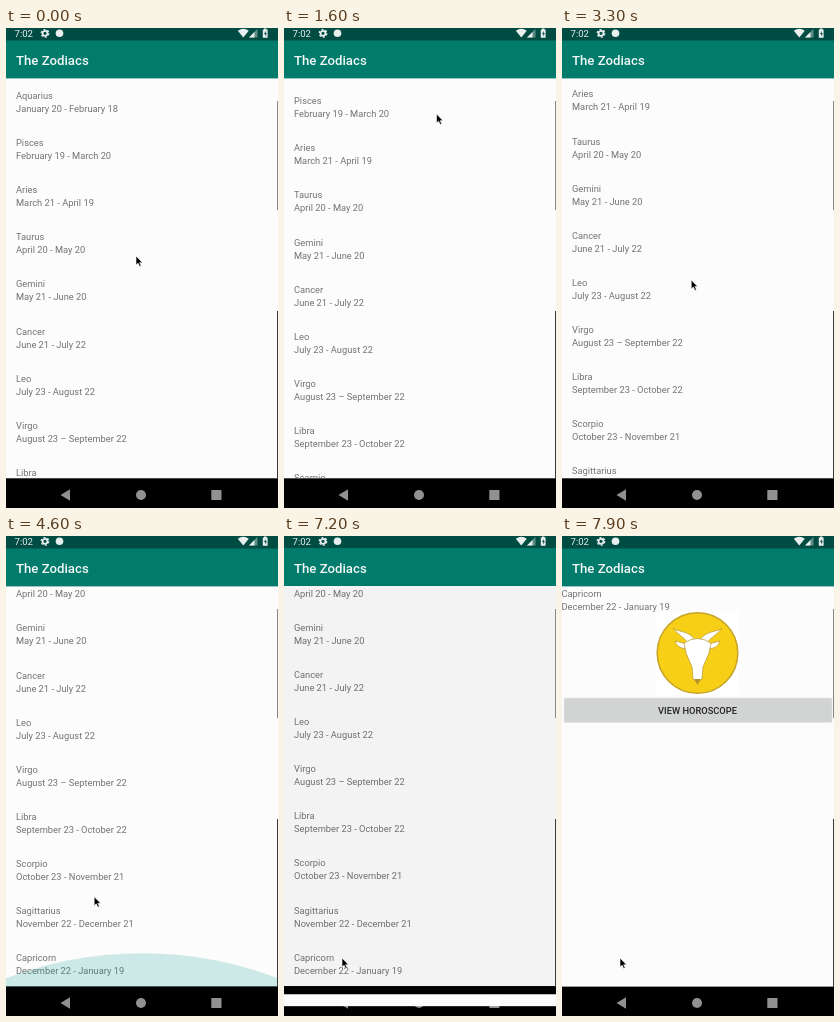
An HTML page that plays this animation: 272x480 px, repeating every 8000 ms.

```html
<!DOCTYPE html>
<html lang="en">
<head>
<meta charset="utf-8">
<title>The Zodiacs</title>
<style>
  html, body { margin: 0; width: 100%; height: 100%; overflow: hidden; background: #000; }
  svg { display: block; width: 100%; height: 100%; overflow: hidden; }
  text { font-family: Roboto, "Open Sans", sans-serif; font-size: 9.3px; fill: #737373; }
  .title { font-size: 13.2px; font-weight: 500; fill: #f4f8f7; }
  .clock { font-size: 9.6px; fill: #e8efee; }
  .button { font-weight: 500; fill: #222; text-anchor: middle; }
</style>
</head>
<body>
<svg viewBox="0 0 272 480">
  <defs>
    <clipPath id="pane"><rect y="50" width="272" height="400.6"/></clipPath>
    <clipPath id="reveal"><rect id="edge" width="272" height="480"/></clipPath>
    <g id="bar">
      <rect width="272" height="50.4" fill="#007b6c"/>
      <rect width="272" height="12.5" fill="#004c42"/>
      <text class="title" x="10" y="37">The Zodiacs</text>
    </g>
    <rect id="page" y="50" width="272" height="400.6" fill="#fcfcfc"/>
  </defs>

  <g id="home">
    <g id="content" clip-path="url(#pane)">
      <use href="#page"/>
      <g id="list"></g>
      <circle id="glow" cx="136" cy="833" r="382" fill="#009688"/>
    </g>
    <use href="#bar"/>
  </g>

  <g clip-path="url(#reveal)">
    <g id="detail">
      <rect width="272" height="480"/>
      <use href="#page"/>
      <use href="#bar"/>
      <text x="-.5" y="60.5">Capricorn</text>
      <text x="-.5" y="73.5">December 22 - January 19</text>
      <rect x="94" y="76" width="83" height="83" fill="#fff"/>
      <circle cx="135.5" cy="117" r="40.3" fill="#f8cf17" stroke="#c6a52a" stroke-width="1.6"/>
      <g fill="#fff" stroke="#b4952a" stroke-width=".7" stroke-linejoin="round">
        <g id="side">
          <path d="M111 92C114 96 127 94 133 104L126 107C122 101 116 99 111 92Z"/>
          <path d="M125 108L113 105Q115 112 124 113Z"/>
        </g>
        <use href="#side" transform="matrix(-1 0 0 1 271 0)"/>
        <path d="M122 107Q135.5 98 149 107L147 117L141 131L140 143Q135.5 147 131 143L130 131L124 117Z"/>
      </g>
      <path d="M132 143H139L135.5 149Z" fill="#b4952a"/>
      <rect x="2" y="162" width="268" height="24.6" rx="1.3" fill="#d2d4d3" stroke="#e4e5e5" stroke-width=".6"/>
      <text class="button" x="135.5" y="177.5">VIEW HOROSCOPE</text>
    </g>
  </g>

  <text class="clock" x="8.5" y="9">7:02</text>
  <g fill="#e8efee">
    <g fill="none" stroke="#e8efee">
      <circle cx="39" cy="5.3" r="2.5" stroke-width="1.8"/>
      <circle cx="39" cy="5.3" r="3.8" stroke-width="1.2" stroke-dasharray="1.99"/>
    </g>
    <circle cx="53.5" cy="5.3" r="3.8"/>
    <path d="M231.8 2.8Q237.3 -1.2 242.8 2.8L237.3 9.6Z"/>
    <path d="M251.5 .8V9.5H243Z" opacity=".4"/>
    <path d="M248.5 4V9.5H243Z"/>
    <path d="M258 .6h2.4v1h1.2v8.2h-4.8v-8.2h1.2z"/>
  </g>
  <path d="M259.7 3l-1.7 3h1.2v2.5l1.7-3.3h-1.2z" fill="#004c42"/>
  <g fill="#fff" opacity=".57">
    <path d="M54.5 467L64 461.3V472.7Z"/>
    <circle cx="135" cy="467" r="5"/>
    <rect x="205.3" y="462" width="10.2" height="10" rx=".6"/>
  </g>
  <path d="M271.5 73V182" stroke="#888"/>
  <path d="M271.5 283V451" stroke="#3a3a3a"/>
  <path id="cursor" d="M0 0V9L2.1 7.2L3.7 10.5L5.2 9.8L3.7 6.7H6.5Z" stroke="#fff" stroke-width=".6"/>
</svg>

<script>
const LOOP = 8000, TICK = 100;
const $ = id => document.getElementById(id);

const signs = `Aquarius, January 20 - February 18
Pisces, February 19 - March 20
Aries, March 21 - April 19
Taurus, April 20 - May 20
Gemini, May 21 - June 20
Cancer, June 21 - July 22
Leo, July 23 - August 22
Virgo, August 23 – September 22
Libra, September 23 - October 22
Scorpio, October 23 - November 21
Sagittarius, November 22 - December 21
Capricorn, December 22 - January 19`;

$("list").innerHTML = signs.split("\n").map((line, i) => {
  const [name, dates] = line.split(", ");
  const y = 71 + i * 47.1;
  return `<text x="10" y="${y}">${name}</text><text x="10" y="${y + 13}">${dates}</text>`;
}).join("");

// Share of the span from start to end that has passed, 0 to 1
const ramp = (t, start, end) => Math.min(1, Math.max(0, (t - start) / (end - start)));

const pointerStart = { x: 130, y: 228 };
const pointerMoves = [
  { start: 0, end: 700, x: 149, y: 131 },
  { start: 900, end: 2500, x: 157, y: 28 },
  { start: 2800, end: 3700, x: 107, y: 431 },
  { start: 3700, end: 4800, x: 84, y: 345 },
  { start: 4800, end: 5600, x: 68, y: 419 },
  { start: 6200, end: 6800, x: 58, y: 422 }
];

function pointerAt(t) {
  return pointerMoves.reduce((from, move) => {
    const k = ramp(t, move.start, move.end);
    return { x: from.x + (move.x - from.x) * k, y: from.y + (move.y - from.y) * k };
  }, pointerStart);
}

function place(id, x, y) {
  $(id).setAttribute("transform", `translate(${x} ${y})`);
}

function draw(t) {
  const pointer = pointerAt(t);
  const scroll = 95.7 * ramp(t, 900, 2500) + 68.3 * ramp(t, 3800, 4400);
  const pull = ramp(t, 4300, 4700) - ramp(t, 4900, 5500);
  const opened = 1 / (1 + Math.exp((7264 - t) / 21));

  place("cursor", pointer.x, pointer.y);
  place("list", 0, -scroll);
  place("glow", 0, -45 * pull);
  $("glow").setAttribute("opacity", .25 * pull);

  place("home", 0, -9.6 * opened);
  $("content").setAttribute("opacity", 1 - Math.min(.1, .75 * opened));
  place("detail", 0, 20.5 * (1 - opened));
  $("edge").setAttribute("y", 480 * (1 - opened));
}

function frame() {
  const t = performance.now() % LOOP;
  draw(t - t % TICK);
  requestAnimationFrame(frame);
}
frame();
</script>
</body>
</html>
```
